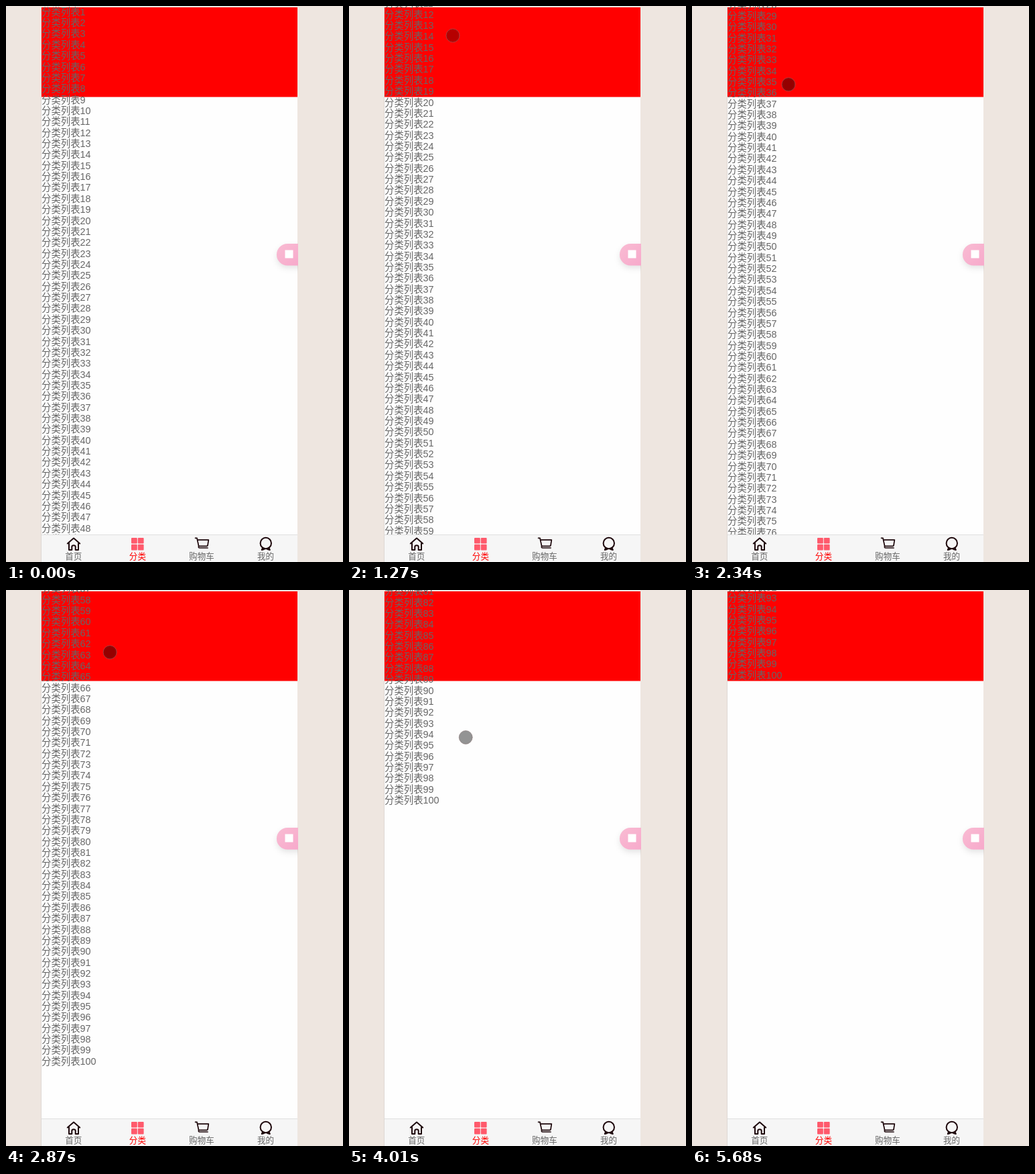
These frames come from a looping animation (503x828 px, 5820 ms). An HTML page with a canvas:

```html
<!DOCTYPE html>
<html lang="zh-CN">
<head>
<meta charset="utf-8">
<title>分类列表</title>
<style>
  html, body { margin: 0; width: 100%; height: 100%; overflow: hidden; background: #eee6e0; }
  canvas { display: block; width: 503px; height: 828px; }
</style>
</head>
<body>
<canvas id="stage"></canvas>
<script>
const W = 503, H = 828, LOOP = 5820;
const FIRST = 130, STEP = 66.875, LAST = 80;
const LEFT = 53, RIGHT = 435, BAR = 787, PITCH = 16.36;
const FONT = '"Liberation Sans", "Noto Sans CJK SC", "Noto Sans CJK", sans-serif';

const canvas = document.getElementById('stage');
const ctx = canvas.getContext('2d');
const ratio = window.devicePixelRatio || 1;
canvas.width = W * ratio;
canvas.height = H * ratio;
ctx.scale(ratio, ratio);

// Scroll offset at a few steps; the gaps are eased.
const SCROLL = [[8, 0], [17, 176], [28, 322], [33, 452], [41, 926.5], [44, 979],
                [51, 1168], [53, 1179], [62, 1435], [67, 1500.6], [72, 1501.5]];

// Step and x at which each upward swipe of the finger ends.
const SWIPES = [[17, 155], [37.3, 142.6], [41.75, 156.2], [51.8, 165.2], [67, 190]];
const TOP = 44, BOTTOM = 235;
const CORNER = { x: 450, y: 817 }, TOUCHDOWN = { x: 152, y: 215 };

const mix = (a, b, u) => a + (b - a) * u;
const smooth = u => u * u * (3 - 2 * u);
const toward = (a, b, u) => ({ x: mix(a.x, b.x, u), y: mix(a.y, b.y, u) });

// Monotone cubic through the points.
function curve(keys, s) {
  const n = keys.length - 1;
  if (s <= keys[0][0]) return keys[0][1];
  if (s >= keys[n][0]) return keys[n][1];
  const slope = i => (keys[i + 1][1] - keys[i][1]) / (keys[i + 1][0] - keys[i][0]);
  const tangent = i => i === 0 || i === n ? 0
    : 2 * slope(i - 1) * slope(i) / (slope(i - 1) + slope(i));
  const i = keys.findIndex(k => k[0] > s) - 1;
  const h = keys[i + 1][0] - keys[i][0];
  const u = (s - keys[i][0]) / h, v = 1 - u;
  return mix(keys[i][1], keys[i + 1][1], smooth(u))
       + h * u * v * (tangent(i) * v - tangent(i + 1) * u);
}

// Enters from the corner, swings down and up between swipes, leaves again.
function touchAt(s) {
  const [start, startX] = SWIPES[0];
  const [end, endX] = SWIPES[SWIPES.length - 1];
  if (s < 8) return toward(CORNER, TOUCHDOWN, smooth(s / 8));
  if (s < start) return toward(TOUCHDOWN, { x: startX, y: TOP }, smooth((s - 8) / (start - 8)));
  if (s >= end) return toward({ x: endX, y: TOP }, CORNER, smooth(Math.max(0, s - 72) / 8));
  const i = SWIPES.findIndex(k => k[0] > s);
  const [t0, x0] = SWIPES[i - 1], [t1, x1] = SWIPES[i];
  const u = (s - t0) / (t1 - t0);
  return {
    x: mix(x0, x1, smooth(u)),
    y: mix(TOP, BOTTOM, (1 - Math.cos(2 * Math.PI * u)) / 2)
  };
}

function rect(color, x, y, w, h) {
  ctx.fillStyle = color;
  ctx.fillRect(x, y, w, h);
}

function rounded(color, x, y, w, h, r) {
  ctx.fillStyle = color;
  ctx.beginPath();
  ctx.roundRect(x, y, w, h, r);
  ctx.fill();
}

function stroke(path) {
  ctx.stroke(new Path2D(path));
}

function clip(x, y, w, h) {
  ctx.save();
  ctx.beginPath();
  ctx.rect(x, y, w, h);
  ctx.clip();
}

function drawList(offset) {
  clip(LEFT, 0, RIGHT - LEFT, BAR);
  ctx.font = '14.4px ' + FONT;
  ctx.textAlign = 'left';
  ctx.fillStyle = '#666';
  for (let n = 1; n <= 100; n++) {
    const y = 13.7 + (n - 1) * PITCH - offset;
    if (y > -6 && y < BAR + 16) ctx.fillText('分类列表' + n, LEFT, y);
  }
  ctx.restore();
}

function drawPill() {
  clip(LEFT, 0, RIGHT + 1 - LEFT, BAR);
  const fill = ctx.createLinearGradient(404, 354, 436, 387);
  fill.addColorStop(0, '#f9bcd3');
  fill.addColorStop(1, '#f7a9cb');
  ctx.shadowColor = 'rgba(0,0,0,0.1)';
  ctx.shadowBlur = 8 * ratio;
  ctx.shadowOffsetY = 4 * ratio;
  rounded(fill, 404, 354, 40, 32.5, [16, 0, 0, 16]);
  ctx.restore();
  rect('#fff', 416.5, 363.5, 12, 12);
}

function drawIcons() {
  ctx.strokeStyle = '#1d070b';
  ctx.lineWidth = 2;
  ctx.lineCap = ctx.lineJoin = 'round';
  // home
  stroke('M91.8 800.5 L101 792.6 L110.2 800.5 M94 800 V810 H98.3 V805.5 Q98.3 803.3 101 803.3 Q103.7 803.3 103.7 805.5 V810 H108 V800');
  // categories
  for (const x of [187, 196.8])
    for (const y of [792, 801.8]) rounded('#ff5a6c', x, y, 8.8, 8.6, 1);
  // cart
  ctx.lineWidth = 1.7;
  stroke('M282.6 792.3 H285 L287.6 804.3 H299.5 Q300.9 804.3 301.1 803 L302.3 795.2 H286 M287.6 804.3 Q286.8 807 289 807 H301');
  // profile
  ctx.lineWidth = 2;
  ctx.beginPath();
  ctx.arc(387.8, 800, 8.2, 0, Math.PI * 2);
  ctx.stroke();
  stroke('M383 807.2 L381.8 810 L385.3 809 M392.6 807.2 L393.8 810 L390.3 809');
}

function drawBar() {
  rect('#f6f6f6', LEFT, BAR, RIGHT - LEFT, H - BAR);
  rect('#e0e0e0', LEFT, BAR, RIGHT - LEFT, 1);
  drawIcons();
  ctx.font = '12.6px ' + FONT;
  ctx.textAlign = 'center';
  ['首页', '分类', '购物车', '我的'].forEach((label, i) => {
    ctx.fillStyle = i === 1 ? '#f00' : '#666';
    ctx.fillText(label, 100.8 + i * 95.6, 824);
  });
}

function drawTouch(s) {
  const { x, y } = touchAt(s);
  ctx.beginPath();
  ctx.arc(x, y, 10, 0, Math.PI * 2);
  ctx.fillStyle = `rgba(0,0,0,${s < 28 ? 0.29 : 0.42})`;
  ctx.fill();
  ctx.strokeStyle = 'rgba(130,110,110,0.55)';
  ctx.lineWidth = 1;
  ctx.stroke();
}

function draw() {
  const t = performance.now() % LOOP;
  // The picture advances in even steps of about 15 per second.
  const step = Math.min(LAST, Math.floor((t - FIRST) / STEP + 0.1));

  rect('#eee6e0', 0, 0, W, H);
  rect('#ded8d4', LEFT - 1, 2, 1, H);
  rect('#fefefe', LEFT, 2, RIGHT - LEFT, H);
  rect('#f00', LEFT, 2, RIGHT - LEFT, 133.5);
  drawList(curve(SCROLL, step));
  drawPill();
  drawBar();
  if (step >= 0 && step < LAST) drawTouch(step);
  requestAnimationFrame(draw);
}

draw();
</script>
</body>
</html>
```
